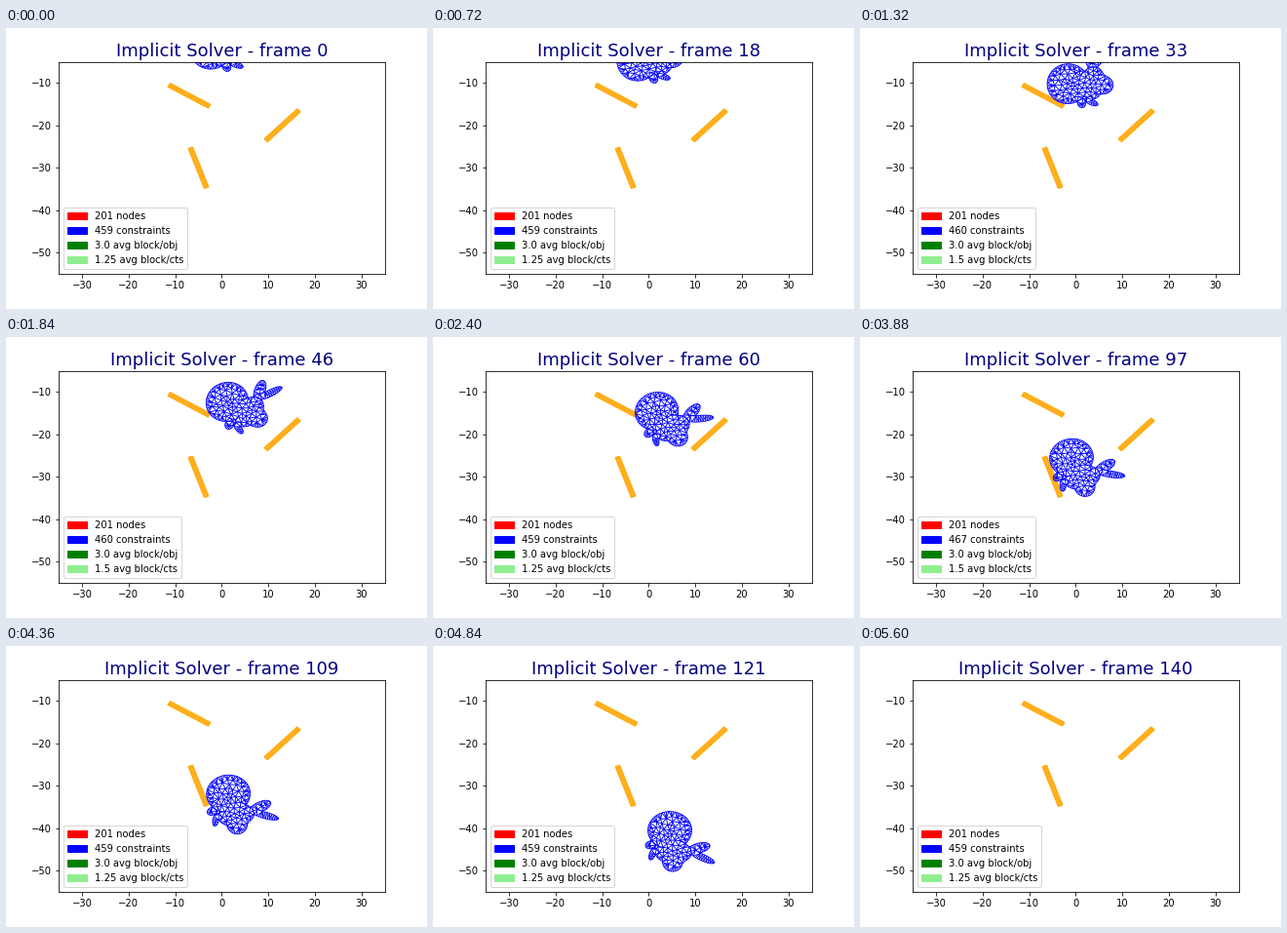
Recreate the animation shown at these times as a matplotlib script. Size 432 by 288 pixels, loop 5.64 s.

```python
import matplotlib.pyplot as plt
import numpy as np
from matplotlib.animation import FuncAnimation
from matplotlib.collections import LineCollection
from matplotlib.patches import Patch, Rectangle
from matplotlib.tri import Triangulation

FRAMES, INTERVAL = 141, 40
FPS, GRAVITY = 24, 9.81
NODES, RIM_STEP = 201, 0.5
CONSTRAINTS = 459

# Ellipses whose union is the soft body: x, y, half axes, degrees
LOBES = [
    (0, 0, 4.7, 4.45, 0),           # back
    (0.8, -5.2, 3.9, 2.6, 0),       # belly
    (0.6, -7.3, 2.2, 2.4, 0),       # hip
    (6.2, -4.2, 2.5, 1.15, 17),     # wide ear
    (7.0, -6.4, 2.9, 0.75, -26),    # long ear
    (-3.7, -5.5, 1.6, 0.65, 70),    # leg
    (-4.1, -3.4, 1.2, 0.9, 20),     # paw
]

# frame, x, y, rotation: first impact, then resting points between bars
POSES = np.array([
    (30, -2.38, -9.70, 90), (46, 1.17, -12.34, 55), (74, 0.96, -17.52, 18),
    (97, -0.92, -25.50, 18), (121, 4.52, -40.50, 0), (140, 7.86, -59.90, -13),
])

# first frame, last frame, most contacts
HITS = [(29, 35, 1), (41, 56, 1), (64, 80, 2), (86, 108, 8)]

BARS = [(-7, -13, -30), (13, -20, 45), (-5, -30, -70)]


def turn(pts, degrees):
    c, s = np.cos(np.radians(degrees)), np.sin(np.radians(degrees))
    return pts @ np.array([[c, s], [-s, c]])


def inside(pts, lobe):
    x, y, a, b, tilt = lobe
    return np.hypot(*(turn(pts - (x, y), -tilt) / (a, b)).T) < 1


def in_body(pts):
    return np.any([inside(pts, lobe) for lobe in LOBES], axis=0)


def rim(lobe):
    """Evenly spaced points of one ellipse that lie outside the others."""
    x, y, a, b, tilt = lobe
    t = np.linspace(0, 2 * np.pi, 400)
    arc = np.cumsum(np.hypot(a * np.sin(t), b * np.cos(t))) * t[1]
    t = np.interp(np.arange(0, arc[-1] - RIM_STEP / 2, RIM_STEP), arc, t)
    pts = turn(np.column_stack([a * np.cos(t), b * np.sin(t)]), tilt) + (x, y)
    others = [inside(pts, o) for o in LOBES if o != lobe]
    return pts[~np.any(others, axis=0)]


def build_mesh():
    pts = np.vstack([rim(lobe) for lobe in LOBES])
    pool = np.random.default_rng(7).uniform(-11, 11, (12000, 2))
    pool = pool[in_body(pool)]
    # Farthest-point sampling spreads the inner nodes evenly
    gap = np.linalg.norm(pool[:, None] - pts, axis=2).min(axis=1)
    while len(pts) < NODES:
        best = pool[gap.argmax()]
        pts = np.vstack([pts, best])
        gap = np.minimum(gap, np.linalg.norm(pool - best, axis=1))
    tri = Triangulation(*pts.T)
    tri.set_mask(~in_body(pts[tri.triangles].mean(axis=1)))
    return pts, tri.edges


def pose(n):
    """Free fall first, then a smooth path through the poses."""
    t, keys = POSES[:, 0], POSES[:, 1:]
    if n <= t[0]:
        x, _, angle = keys[0]
        return x, -2.04 - GRAVITY / 2 * (n / FPS) ** 2, angle
    i = np.searchsorted(t, n) - 1
    h = t[i + 1] - t[i]
    u = (n - t[i]) / h
    slope = np.gradient(keys, t, axis=0) * h
    return ((1 + 2 * u) * (1 - u) ** 2 * keys[i]
            + u * (1 - u) ** 2 * slope[i]
            + u * u * (3 - 2 * u) * keys[i + 1]
            + u * u * (u - 1) * slope[i + 1])


def contacts(n):
    return sum(int(np.ceil(peak * np.sin(np.pi * (n - a) / (b - a))))
               for a, b, peak in HITS if a < n < b)


def draw_legend(hits):
    rows = [("red", f"{NODES} nodes"),
            ("blue", f"{CONSTRAINTS + hits} constraints"),
            ("green", "3.0 avg block/obj"),
            ("lightgreen", f"{1.5 if hits else 1.25} avg block/cts")]
    ax.legend(handles=[Patch(color=c, label=s) for c, s in rows],
              loc="lower left")


def update(n):
    x, y, angle = pose(n)
    mesh.set_segments((turn(nodes, angle) + (x, y))[edges])
    title.set_text(f"Implicit Solver - frame {n}")
    draw_legend(contacts(n))
    return mesh, title


plt.rcParams.update({"font.family": "DejaVu Sans", "font.size": 10,
                     "text.kerning_factor": 6})
fig, ax = plt.subplots(figsize=(6, 4), dpi=72)
fig.subplots_adjust(left=0.125, right=0.9, bottom=0.125, top=0.88)
ax.set(xlim=(-35, 35), ylim=(-55, -5))
title = ax.set_title("", fontsize=18, color="navy")

for bx, by, angle in BARS:
    ax.add_patch(Rectangle((bx - 5, by - 0.5), 10, 1, angle=angle,
                           rotation_point="center", color="orange",
                           linewidth=1.2, alpha=0.88))

nodes, edges = build_mesh()
mesh = LineCollection([], colors="blue", linewidths=0.9, zorder=2)
ax.add_collection(mesh, autolim=False)

anim = FuncAnimation(fig, update, frames=FRAMES, interval=INTERVAL,
                     init_func=lambda: update(0), repeat=True, repeat_delay=0)
plt.show()
```
